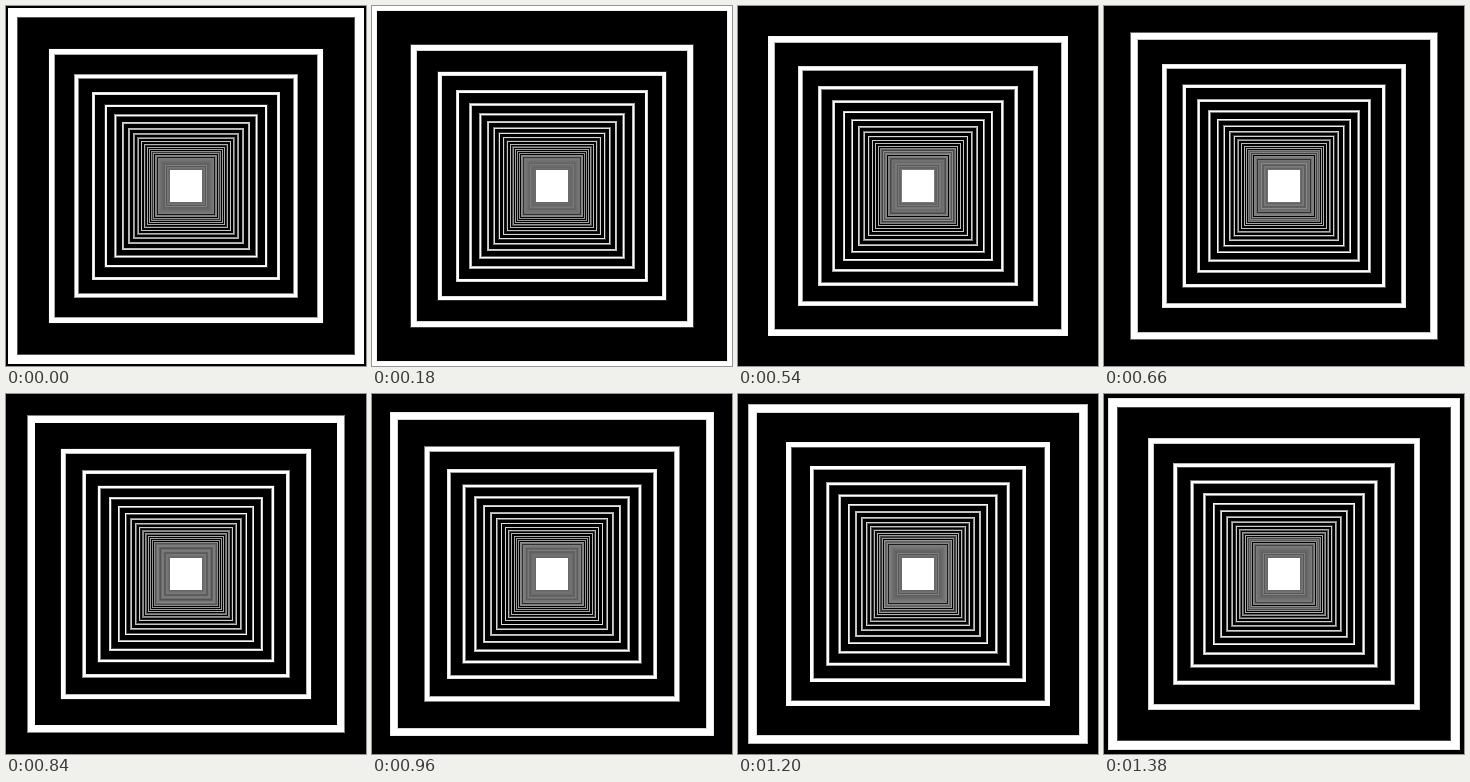
An HTML page with a canvas for the animation above (1440 ms loop, 360 by 360 pixels).

```html
<!DOCTYPE html>
<html lang="en">
<head>
<meta charset="utf-8">
<title>Square tunnel</title>
<style>
  html, body { margin: 0; width: 100%; height: 100%; overflow: hidden; background: #000; }
  canvas { display: block; width: 360px; height: 360px; }
</style>
</head>
<body>
<canvas id="stage" width="360" height="360"></canvas>
<script>
const ctx = document.getElementById('stage').getContext('2d');
const LOOP = 1440, STEP = 60;
const CENTER = 180, CORE = 16;
const FOCAL = 595;    // half size of a square at depth 1
const NEAR = 3.343;   // depth of the front square when the loop starts
const DEPTH = 0.18;   // thickness of each square along the tunnel
const RINGS = 36;

function drawSquare(half, gray) {
  ctx.fillStyle = `rgb(${gray},${gray},${gray})`;
  ctx.fillRect(CENTER - half, CENTER - half, half * 2, half * 2);
}

// Share of each one-pixel band, counted from the centre, that is lit.
function bandCoverage(progress) {
  const cover = new Float32Array(CENTER);
  for (let k = 0; k < RINGS; k++) {
    const z = NEAR + k - progress;
    const outer = Math.min(CENTER, FOCAL / z);
    const inner = FOCAL / (z + DEPTH);
    for (let d = Math.floor(inner); d < outer; d++) {
      cover[d] += Math.min(d + 1, outer) - Math.max(d, inner);
    }
  }
  return cover;
}

function draw(time) {
  const cover = bandCoverage(time / LOOP);
  for (let d = CENTER - 1; d >= CORE; d--) {
    // The square root blends partly lit bands in linear light.
    drawSquare(d + 1, Math.round(255 * Math.sqrt(Math.min(1, cover[d]))));
  }
  drawSquare(CORE, 255);
}

const start = performance.now();
function tick() {
  const time = (performance.now() - start) % LOOP;
  draw(Math.floor(time / STEP) * STEP);
  requestAnimationFrame(tick);
}
tick();
</script>
</body>
</html>
```
